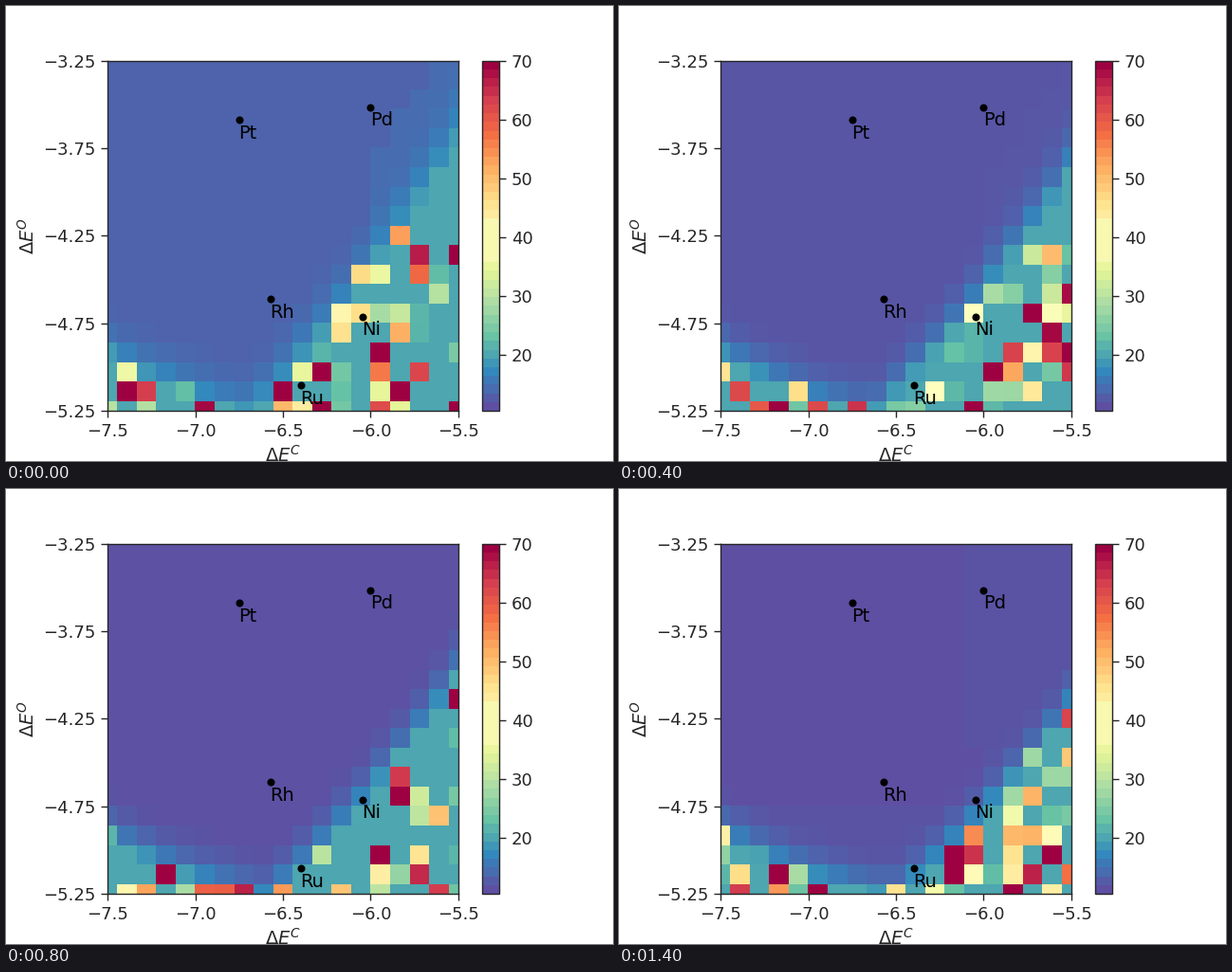
A matplotlib script that plays this animation: 640x480 px, repeating every 1.5 s.

```python
import numpy as np
import matplotlib.pyplot as plt
from matplotlib.animation import FuncAnimation
from matplotlib.cm import ScalarMappable
from matplotlib.colors import ListedColormap, Normalize

FRAMES, STEP_MS = 15, 100
N = 19
VMIN, VMAX = 10.47, 70
PLATEAU = 19.7
INK = "0.15"

plt.rcParams.update({
    "font.family": "DejaVu Sans", "font.size": 13, "axes.labelsize": 14,
    "axes.linewidth": 1, "axes.edgecolor": INK, "axes.labelcolor": INK,
    "xtick.color": INK, "ytick.color": INK,
    "xtick.major.size": 4.8, "ytick.major.size": 4.8,
    "xtick.major.width": 1, "ytick.major.width": 1,
    "xtick.major.pad": 4.2, "ytick.major.pad": 4.2,
})

METALS = {
    "Pt": (-6.75, -3.588), "Pd": (-6.0, -3.517), "Rh": (-6.57, -4.613),
    "Ni": (-6.045, -4.713), "Ru": (-6.397, -5.104),
}

row, col = np.mgrid[0:N, 0:N]


def front_row(u):
    """Row where the steep region starts: a steep right arm, a shallow left one."""
    s = N - 1 - col
    right = 2 + 5 * u + (1.7 - 0.35 * u) * s - 0.03 * s ** 2
    left = 13.9 - 0.3 * u + 0.55 * col - 0.02 * col ** 2
    return np.minimum(left, right)


def smooth_field(t):
    """Flat floor rising past the front to a plateau; also the depth past it."""
    u = (t / (FRAMES - 1)) ** 0.8
    depth = row - front_row(u)
    growth = 3 - 1.3 * (1 - u) * col / (N - 1)
    floor = 10.6 + 2.1 * np.exp(-t / 3.2)
    if t >= 9:
        edge = 8.5 + 0.9 * (t - 10) + row / 12
        floor = floor + 0.35 * ((col > edge) | (row > 13))
    halo = 0.8 * (1 - u) ** 2 * ((depth > -4.2) & (col > 13))
    rise = np.maximum(1.9 * growth ** depth - 0.5, 0)
    return np.minimum(floor + halo + rise, PLATEAU), depth


def heat(t):
    """Smooth field with unconverged cells scattered behind the front."""
    field, depth = smooth_field(t)
    rng = np.random.default_rng(40 + t)
    chance = 0.48 * np.clip((row - 5) / 7, 0, 1) + 0.15 * (row == N - 1)
    noisy = (rng.random((N, N)) < chance) & (depth > 1.2)
    spikes = np.minimum(21 + 70 * rng.random((N, N)) ** 1.5, VMAX)
    return np.where(noisy, spikes, field)


fig, ax = plt.subplots(figsize=(6.4, 4.8), dpi=100, facecolor="white")
half = 1 / (N - 1)
image = ax.imshow(heat(0), cmap="Spectral_r", vmin=VMIN, vmax=VMAX,
                  interpolation="nearest",
                  extent=(-7.5 - half, -5.5 + half, -5.25 - half, -3.25 + half))
ax.set(xlim=(-7.5, -5.5), ylim=(-5.25, -3.25),
       xticks=np.arange(-7.5, -5.4, 0.5), yticks=np.arange(-5.25, -3.2, 0.5),
       xlabel=r"$\Delta E^C$", ylabel=r"$\Delta E^O$")

for name, spot in METALS.items():
    ax.plot(*spot, "o", color="black", ms=5.8, mew=0)
    ax.annotate(name, spot, xytext=(-0.5, -14), textcoords="offset points",
                fontsize=14, color="black", va="baseline")

# The bar has coarse bands with one flat pale stretch in the middle.
bands = plt.get_cmap("Spectral_r")(np.linspace(0, 1, 40))
bands[17:22, :3] = 0.973, 0.973, 0.69
scale = ScalarMappable(Normalize(VMIN, VMAX), ListedColormap(bands))
bar = fig.colorbar(scale, ax=ax, ticks=range(20, 71, 10))
bar.outline.set_edgecolor(INK)


def draw(t):
    image.set_data(heat(t))
    return [image]


anim = FuncAnimation(fig, draw, frames=FRAMES, interval=STEP_MS,
                     repeat=True, repeat_delay=0, blit=False)
plt.show()
```
